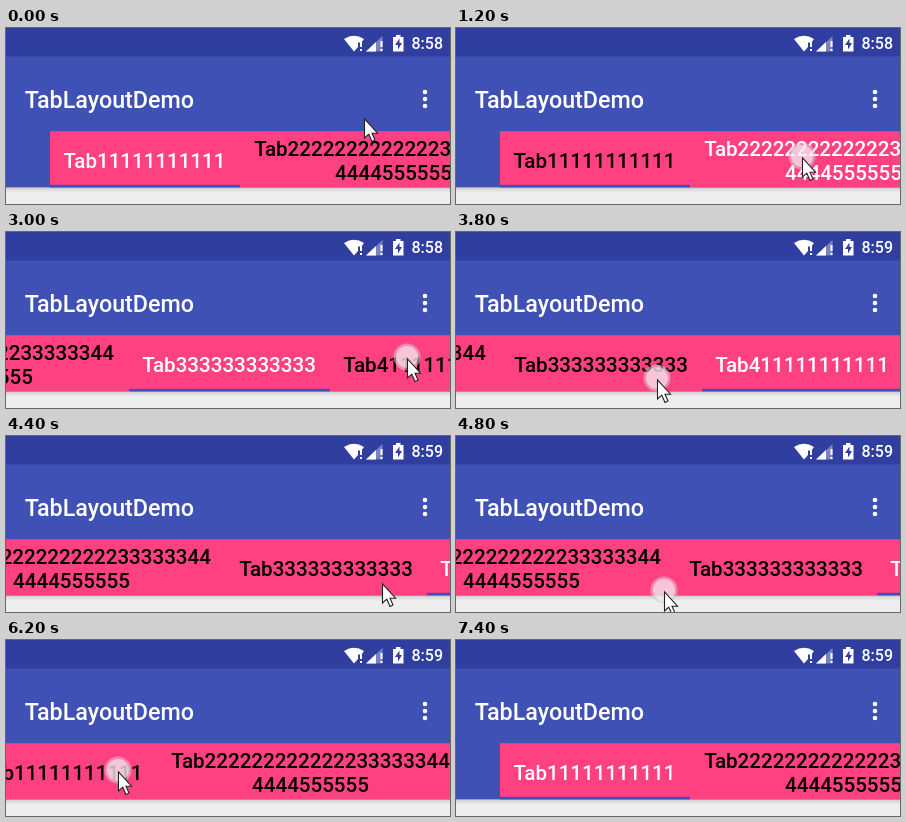
Animation, 444 px wide and 176 px high, one loop 8.6 s. Source, as an HTML page:

```html
<!DOCTYPE html>
<html lang="en">
<head>
<meta charset="utf-8">
<title>TabLayoutDemo</title>
<style>
  html, body { margin: 0; width: 100%; height: 100%; overflow: hidden; background: #eee; }
  svg { display: block; width: 444px; height: 176px; }
  text { font-family: Roboto, sans-serif; font-weight: 500; fill: #fff; }
  .tab text { font-size: 20.55px; text-anchor: middle; fill: #000; }
  .tab.selected text { fill: #fff; }
</style>
</head>
<body>
<svg viewBox="0 0 444 176">
  <defs>
    <linearGradient id="shadow" x2="0" y2="1">
      <stop stop-color="#bdbdbd"/>
      <stop offset=".4" stop-color="#dcdcdc"/>
      <stop offset="1" stop-color="#eee"/>
    </linearGradient>
  </defs>
  <rect width="444" height="176" fill="#eee"/>
  <rect y="159" width="444" height="6" fill="url(#shadow)"/>
  <rect width="444" height="159.3" fill="#3f51b5"/>
  <rect width="444" height="28.5" fill="#303f9f"/>

  <!-- status icons -->
  <g fill="#fff">
    <path d="M338 11Q348 4.500 358 11L355.500 14.500H352V19L348 23.500Z"/>
    <path d="M354 13h2v6h-2zM354 21h2v2h-2z"/>
    <path d="M360 23.500L376.500 8V23.500Z" opacity=".35"/>
    <path d="M360 23.500L370 14V23.500Z"/>
    <path d="M374.500 13h2v6h-2zM374.500 21h2v2h-2z"/>
    <path d="M387 9h3V7h4.500v2h3v14.500H387Z"/>
    <path d="M393.500 10.500L389 17h3v4.500L396 15h-2.500Z" fill="#303f9f"/>
  </g>
  <text id="clock" x="405.500" y="21" font-size="16"></text>

  <text x="18.700" y="80" font-size="23.300">TabLayoutDemo</text>
  <g fill="#fff">
    <circle cx="419" cy="64" r="2.300"/>
    <circle cx="419" cy="71" r="2.300"/>
    <circle cx="419" cy="78" r="2.300"/>
  </g>

  <g id="strip">
    <rect x="44" y="103.200" width="900" height="56.100" fill="#ff4081"/>
    <rect id="indicator" y="156.800" height="2.500" fill="#3f51b5"/>
  </g>

  <g id="pointer">
    <g id="touch">
      <circle cy="-2" r="13.500" fill="#dcc8d8" opacity=".55"/>
      <circle cy="-2" r="11" fill="#fff" opacity=".5"/>
    </g>
    <path d="M.5 0V19L4.800 15.200L8 22.500L11 21L8 14.200H13.500Z" fill="#fff" stroke="#222" stroke-width="1.100"/>
  </g>
</svg>
<script>
const LOOP = 8600, STEP = 200, LAST_STEP = 7400;
const VIEW_WIDTH = 447, STRIP_END = 944;
const TAP = 400, RESPONSE = 200, SLIDE = 400;
const $ = id => document.getElementById(id);

const tabs = [
  { width: 190, lines: ['Tab' + '1'.repeat(11)] },
  { width: 308, lines: ['Tab' + '2'.repeat(13) + '33333344', '4444555555'] },
  { width: 201, lines: ['Tab' + '3'.repeat(12)] },
  { width: 201, lines: ['Tab4' + '1'.repeat(11)] }
];

const rest = (start, x, y) => ({ start, end: start, x, y, toX: x });
const tap = (start, x, y, tab) => ({ start, end: start + TAP, x, y, toX: x, tab });
const drag = (start, x, y, toX) => ({ start, end: start + 600, x, y, toX });

const gestures = [
  rest(200, 358, 91),
  tap(1000, 346, 130, 1),
  tap(2000, 400, 134, 2),
  tap(3000, 401, 127, 3),
  drag(3800, 201, 148, 376),
  drag(4800, 208, 156, 447),
  tap(6200, 112, 132, 0),
  rest(7000, 112, 132),
  rest(7200, 131, 136)
];

const clamp = (v, min, max) => Math.min(Math.max(v, min), max);
const lerp = (a, b, k) => a + (b - a) * k;
const progress = (t, start, end) => end > start ? clamp((t - start) / (end - start), 0, 1) : +(t >= end);
const easeOut = k => 1 - (1 - k) ** 4;
const smooth = k => k * k * (3 - 2 * k);
const centredScroll = tab => clamp(tab.x + tab.width / 2 - VIEW_WIDTH / 2, 0, STRIP_END - VIEW_WIDTH);

function add(parent, name, attributes) {
  const node = document.createElementNS('http://www.w3.org/2000/svg', name);
  for (const key in attributes) node.setAttribute(key, attributes[key]);
  return parent.appendChild(node);
}

let nextX = 44;
for (const tab of tabs) {
  tab.x = nextX;
  nextX += tab.width;
  tab.node = add($('strip'), 'g', { class: 'tab' });
  tab.lines.forEach((line, i) => {
    const y = tab.lines.length > 1 ? 127.5 + 24 * i : 139.7;
    add(tab.node, 'text', { x: tab.x + tab.width / 2 - .5, y }).textContent = line;
  });
}

function stripState(t) {
  let scroll = 0, selected = 0, { x, width } = tabs[0];
  for (const g of gestures) {
    if (g.tab === undefined) {
      scroll -= (g.toX - g.x) * easeOut(progress(t, g.start, g.end));
      continue;
    }
    const begin = g.start + RESPONSE, tab = tabs[g.tab];
    const k = easeOut(progress(t, begin, begin + SLIDE));
    scroll = lerp(scroll, centredScroll(tab), k);
    x = lerp(x, tab.x, k);
    width = lerp(width, tab.width, k);
    if (t >= begin) selected = g.tab;
  }
  return { scroll, selected, x, width };
}

function pointerState(t) {
  const i = Math.max(0, gestures.findLastIndex(g => g.start <= t));
  const g = gestures[i], next = gestures[i + 1] ?? g;
  const travel = smooth(progress(t, g.end, next.start));
  const reached = lerp(g.x, g.toX, easeOut(progress(t, g.start, g.end)));
  return {
    x: lerp(reached, next.x, travel),
    y: lerp(g.y, next.y, travel),
    pressed: t >= g.start && t < g.end
  };
}

function draw(t) {
  const strip = stripState(t), pointer = pointerState(t);
  $('strip').setAttribute('transform', `translate(${-strip.scroll})`);
  $('indicator').setAttribute('x', strip.x);
  $('indicator').setAttribute('width', strip.width);
  tabs.forEach((tab, i) => tab.node.classList.toggle('selected', i === strip.selected));

  $('pointer').setAttribute('transform', `translate(${pointer.x} ${pointer.y})`);
  $('pointer').style.display = t < LAST_STEP ? '' : 'none';
  $('touch').style.display = pointer.pressed ? '' : 'none';
  $('clock').textContent = t < 3400 ? '8:58' : '8:59';
}

function tick() {
  const t = performance.now() % LOOP;
  draw(Math.min(Math.floor(t / STEP) * STEP, LAST_STEP));
  requestAnimationFrame(tick);
}
tick();
</script>
</body>
</html>
```
